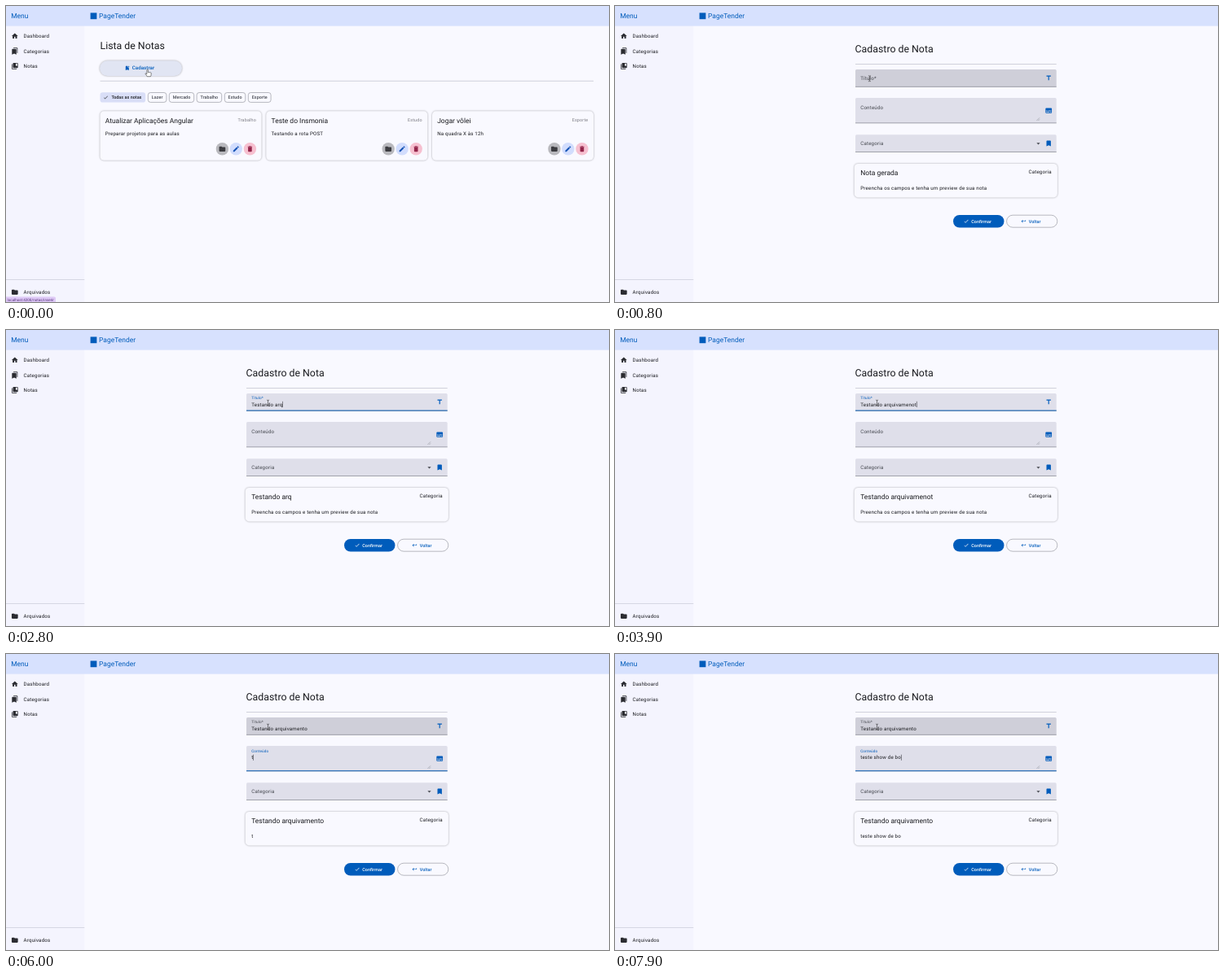
Animation of 740 by 364 pixels, one loop 8 s. Source, as an HTML page:

```html
<!DOCTYPE html>
<html lang="pt-BR">
<head>
<meta charset="utf-8">
<title>Cadastro de Nota</title>
<style>
  html, body { margin: 0; width: 100%; height: 100%; overflow: hidden; background: #f9f9ff; }
  svg { display: block; width: 100%; height: 100%; }
  text { font-family: Roboto, sans-serif; fill: #1a1b1f; white-space: pre; text-rendering: geometricPrecision; }
  .h1 { font-size: 12.33px; }
  .h2 { font-size: 8.48px; }
  .body { font-size: 6.17px; letter-spacing: .19px; }
  .tag { font-size: 5.4px; letter-spacing: .17px; fill: #7b7b82; }
  .label { font-size: 5.4px; letter-spacing: .04px; font-weight: 500; }
  .action { font-size: 6.17px; letter-spacing: .04px; font-weight: 500; }
  .status { font-size: 4.53px; fill: #55307a; }
  .blue { fill: #005cbb; }
  .muted { fill: #44474e; }
  .white { fill: #fff; }
  .end { text-anchor: end; }
  .raised { filter: drop-shadow(0 .6px .8px rgba(0, 0, 0, .34)); }
</style>
</head>
<body>
<svg id="stage" viewBox="0 0 740 364" xmlns="http://www.w3.org/2000/svg"></svg>
<script>
const LOOP = 8000, TICK = 100;
const BLUE = '#005cbb', DARK = '#2b2c31', GREY = '#44474e';
const FIELD = '#dfdfea', FIELD_HOVER = '#cfcfd9', SURFACE = '#f9f9ff';

// Icons on a 24 unit grid
const ICONS = {
  home: 'M10 20v-6h4v6h5v-8h3L12 3 2 12h3v8z',
  bookmarks: 'M19 18l2 1V3c0-1.1-.9-2-2-2H9C7.9 1 7 1.9 7 3h10c1.1 0 2 .9 2 2zM15 5H5c-1.1 0-2 .9-2 2v16l7-3 7 3V7c0-1.1-.9-2-2-2z',
  notes: 'M4 6H2v14c0 1.1.9 2 2 2h14v-2H4zM20 2H8c-1.1 0-2 .9-2 2v12c0 1.1.9 2 2 2h12c1.1 0 2-.9 2-2V4c0-1.1-.9-2-2-2zm0 10l-2.5-1.5L15 12V4h5z',
  folder: 'M10 4H4c-1.1 0-2 .9-2 2v12c0 1.1.9 2 2 2h16c1.1 0 2-.9 2-2V8c0-1.1-.9-2-2-2h-8z',
  edit: 'M3 17.25V21h3.75L17.8 9.94l-3.75-3.75zM20.7 7.04c.4-.4.4-1 0-1.4l-2.3-2.35c-.4-.4-1-.4-1.4 0l-1.9 1.83 3.75 3.75z',
  trash: 'M6 19c0 1.1.9 2 2 2h8c1.1 0 2-.9 2-2V7H6zM19 4h-3.5l-1-1h-5l-1 1H5v2h14z',
  title: 'M5 4v3h5.5v12h3V7H19V4z',
  subtitles: 'M20 4H4c-1.1 0-2 .9-2 2v12c0 1.1.9 2 2 2h16c1.1 0 2-.9 2-2V6c0-1.1-.9-2-2-2zM4 12h4v2H4zm10 6H4v-2h10zm6 0h-4v-2h4zm0-4H10v-2h10z',
  bookmark: 'M17 3H7c-1.1 0-2 .9-2 2v16l7-3 7 3V5c0-1.1-.9-2-2-2z',
  bookmarkAdd: 'M19 11v10l-7-3-7 3V5c0-1.1.9-2 2-2h6.5c-1.2 4 1.5 8 5.5 8zM21 7h-2v2h-2V7h-2V5h2V3h2v2h2z',
  check: 'M9 16.17L4.83 12l-1.42 1.41L9 19 21 7l-1.41-1.41z',
  back: 'M19 7v4H5.83l3.58-3.59L8 6l-6 6 6 6 1.41-1.41L5.83 13H21V7z'
};

const rect = (x, y, w, h, fill, attrs = '') =>
  `<rect x="${x}" y="${y}" width="${w}" height="${h}" fill="${fill}" ${attrs}/>`;
const text = (x, y, cls, str, id = '') =>
  `<text x="${x}" y="${y}" class="${cls}" ${id && `id="${id}"`}>${str}</text>`;
const icon = (name, cx, cy, fill, size = 9.25) =>
  `<path d="${ICONS[name]}" fill="${fill}" fill-rule="evenodd" transform="translate(${cx - size / 2} ${cy - size / 2}) scale(${size / 24})"/>`;
const card = (x, y, w, h) => rect(x, y, w, h, SURFACE, 'rx="4.6" class="raised"');

function shell() {
  const item = (name, label, y) => icon(name, 10.8, y, DARK) + text(21.6, y + 2.2, 'body', label);
  return rect(0, 0, 740, 364, SURFACE) + rect(0, 0, 96.3, 364, '#f4f4fe') +
    rect(0, 0, 740, 24.6, '#d7e1fe') +
    text(6.2, 15.3, 'h2 blue', 'Menu') +
    rect(103.6, 8.4, 7.8, 7.8, BLUE) + text(114, 15.3, 'h2 blue', 'PageTender') +
    item('home', 'Dashboard', 36.9) + item('bookmarks', 'Categorias', 55.4) + item('notes', 'Notas', 73.9) +
    rect(0, 336, 96.3, .8, '#cfd0dc') + item('folder', 'Arquivados', 351.8);
}

function noteCard(x, title, tag, body) {
  const button = (dx, fill, name, color) =>
    `<circle cx="${x + dx}" cy="175.8" r="7.7" fill="${fill}"/>` + icon(name, x + dx, 175.8, color);
  return card(x, 129.3, 198, 60.4) +
    text(x + 6.2, 143.8, 'h2', title) + text(x + 191.4, 142.2, 'tag end', tag) +
    text(x + 6.2, 159.1, 'body', body) +
    button(149.9, '#b9b9be', 'folder', '#3c3c41') +
    button(166.8, '#d2ddfd', 'edit', '#1553b5') +
    button(183.9, '#f6c0d0', 'trash', '#93254a');
}

function listPage() {
  const chip = (x, w, label) =>
    rect(x, 106.5, w, 11.9, 'none', 'rx="3" stroke="#74777f" stroke-width=".5"') +
    text(x + w / 2, 114.2, 'label muted', label).replace('<text', '<text text-anchor="middle"');
  return text(115.5, 53.1, 'h1', 'Lista de Notas') +
    rect(115, 67.2, 101, 18.8, '#e1e5f3', 'rx="9.4" class="raised"') +
    icon('bookmarkAdd', 148.8, 76.4, BLUE, 6.9) + text(154.8, 78.4, 'action blue', 'Cadastrar') +
    rect(115.5, 91.8, 605.5, .8, '#c6c7d1') +
    rect(115.5, 106.3, 55.7, 12.3, '#d9def7', 'rx="3.1"') +
    icon('check', 122.4, 112.4, GREY, 6.9) + text(129.4, 114.2, 'label', 'Todas as notas') +
    chip(174.3, 22.6, 'Lazer') + chip(200.3, 30.4, 'Mercado') + chip(234.1, 30.6, 'Trabalho') +
    chip(268.3, 25.5, 'Estudo') + chip(297.3, 27.8, 'Esporte') +
    noteCard(115.5, 'Atualizar Aplicações Angular', 'Trabalho', 'Preparar projetos para as aulas') +
    noteCard(319.3, 'Teste do Insmonia', 'Estudo', 'Testando a rota POST') +
    noteCard(523, 'Jogar vôlei', 'Esporte', 'Na quadra X às 12h');
}

function formField(id, y, h, label, labelY, name, iconY) {
  const r = 1.5, x = 295, w = 246.7;
  return `<path id="${id}Box" fill="${FIELD}" d="M${x} ${y + h}V${y + r}q0-${r} ${r}-${r}H${x + w - r}q${r} 0 ${r} ${r}V${y + h}z"/>` +
    rect(x, y + h - .6, w, .6, '#74777f') +
    rect(x, y + h - .9, w, .9, BLUE, `id="${id}Line" opacity="0"`) +
    text(0, 0, 'body muted', label, id + 'Label')
      .replace('<text', `<text transform="translate(301.2 ${labelY})"`) +
    icon(name, 532.2, iconY, BLUE);
}

function formPage() {
  return text(294.6, 57, 'h1', 'Cadastro de Nota') + rect(295, 71.1, 246.7, .8, '#c6c7d1') +
    formField('title', 78, 21.5, 'Título*', 90.8, 'title', 88.6) +
    formField('content', 113, 31.2, 'Conteúdo', 126.5, 'subtitles', 128.6) +
    formField('category', 158.2, 21.5, 'Categoria', 171.2, 'bookmark', 169) +
    '<path d="M517.4 141l3.6-3.6M519.4 141l1.6-1.6" stroke="#6b6c74" stroke-width=".4"/>' +
    '<path d="M517.4 168.3h4.2l-2.1 2.1z" fill="#44474e"/>' +
    text(301.2, 93.5, 'body', '', 'titleText') + text(301.2, 129.2, 'body', '', 'contentText') +
    rect(0, 0, .5, 7.2, '#1a1b1f', 'id="caret"') +
    card(293.7, 194, 249.2, 41.4) +
    text(301.2, 207.9, 'h2', '', 'previewTitle') + text(535.7, 206.3, 'body end', 'Categoria') +
    text(301.2, 226.4, 'body', '', 'previewBody') +
    rect(415, 257, 62.5, 15.4, BLUE, 'rx="7.7"') + icon('check', 431, 264.7, '#fff', 6.9) +
    text(437.3, 266.5, 'label white', 'Confirmar') +
    rect(480.6, 257.2, 62.2, 15, 'none', 'rx="7.5" stroke="#74777f" stroke-width=".5"') +
    icon('back', 501.5, 264.7, BLUE, 6.9) + text(507.8, 266.5, 'label blue', 'Voltar');
}

// Cursor shapes with the hot spot at 0,0
function cursors() {
  const outline = 'fill="#fff" stroke="#222" stroke-width=".55" stroke-linejoin="round"';
  return '<g id="cursor">' +
    `<path id="hand" ${outline} d="M-.7.6q.7-1 1.4 0v3q.7-.7 1.3.1q.7-.6 1.3.2q.8-.4 1.2.5v2.1q0 1.2-.7 2.2H-.4q-.7-1.5-2.1-3q-.3-1.2.8-.9l1 .9z"/>` +
    `<path id="arrow" ${outline} d="M0 0v6.1l1.4-1.3.9 2.1 1-.4-.9-2.1h1.9z"/>` +
    '<path id="beam" fill="none" stroke="#222" stroke-width=".55" d="M-1.5-3.4H-.5L0-3l.5-.4h1M0-3v6M-1.5 3.4h1L0 3l.5.4h1"/></g>';
}

const stage = document.getElementById('stage');
stage.innerHTML = shell() +
  `<g id="list">${listPage()}</g><g id="form">${formPage()}</g>` +
  '<g id="status"><path d="M0 357.4h59q2 0 2 2V364H0z" fill="#dec9f6"/>' +
  text(1.6, 362.6, 'status', 'localhost:4200/notas/inserir') + '</g>' + cursors();

const el = {};
stage.querySelectorAll('[id]').forEach(node => el[node.id] = node);

const TITLE = 'Testando arquivamento', CONTENT = 'teste show de bo';
// Each run: start time, first length, last length; one letter per tick
const TITLE_RUNS = [[1400, 1, 1], [1700, 3, 3], [1900, 4, 10], [2700, 11, 12], [3000, 13, 13], [3200, 14, 14],
  [3500, 16, 16], [3700, 19, 19], [4500, 20, 20], [5000, 21, 21]];
const CONTENT_RUNS = [[6000, 1, 1], [6200, 2, 3], [6500, 4, 6], [6900, 7, 8], [7200, 10, 10], [7400, 11, 16]];

function typed(str, runs, t) {
  let n = 0;
  for (const [at, from, to] of runs) if (t >= at) n = Math.min(to, from + (t - at) / TICK);
  return str.slice(0, n);
}

const mix = (a, b, p) => a + (b - a) * p;
const clamp = v => Math.max(0, Math.min(1, v));
const steps = (t, start, n) => clamp(((t - start) / TICK + 1) / n);
const show = (node, on) => node.setAttribute('display', on ? 'inline' : 'none');

function pointer(t) {
  if (t <= 300) return [mix(173.6, 198.6, t / 300), mix(78, 84.6, t / 300)];
  const p = clamp((t - 300) / 600), e = p * p * (3 - 2 * p);
  return [mix(198.6, 321.5, e), mix(84.6, 89.6, e)];
}

function floatLabel(node, from, to, p, focused) {
  node.setAttribute('transform', `translate(301.2 ${mix(from, to, p)}) scale(${mix(1, .75, p)})`);
  node.style.fill = focused ? BLUE : GREY;
}

function draw(ms) {
  const t = Math.floor(ms / TICK) * TICK;
  const [x, y] = pointer(t), over = x > 295, inForm = t >= 100;
  show(el.list, !inForm);
  show(el.form, inForm);
  show(el.status, t < 600);
  show(el.hand, !inForm);
  show(el.arrow, inForm && !over);
  show(el.beam, over);
  el.cursor.setAttribute('transform', `translate(${x} ${y})`);

  const titleOn = steps(t, 1000, 2), contentOn = steps(t, 5500, 3);
  const inTitle = t >= 1000 && t < 5000, inContent = t >= 5000;
  el.titleBox.setAttribute('fill', over && !inTitle ? FIELD_HOVER : FIELD);
  el.titleLine.setAttribute('opacity', titleOn * (1 - contentOn));
  el.contentLine.setAttribute('opacity', contentOn);
  floatLabel(el.titleLabel, 90.8, 84.9, titleOn, inTitle);
  floatLabel(el.contentLabel, 126.5, 120.6, contentOn, contentOn > 0);

  const typo = t >= 3900 && t < 4100 ? 'ot' : '';
  const title = typed(TITLE, TITLE_RUNS, t) + typo;
  const content = typed(CONTENT, CONTENT_RUNS, t);
  el.titleText.textContent = title;
  el.contentText.textContent = content;
  el.previewTitle.textContent = title || 'Nota gerada';
  el.previewBody.textContent = content || 'Preencha os campos e tenha um preview de sua nota';

  const active = inContent ? el.contentText : el.titleText;
  const width = active.textContent ? active.getComputedTextLength() : 0;
  el.caret.setAttribute('x', 301.2 + width);
  el.caret.setAttribute('y', inContent ? 123.7 : 87.8);
  show(el.caret, inTitle || inContent);
}

const begin = performance.now();
function frame() {
  draw((performance.now() - begin) % LOOP);
  requestAnimationFrame(frame);
}
frame();
</script>
</body>
</html>
```
